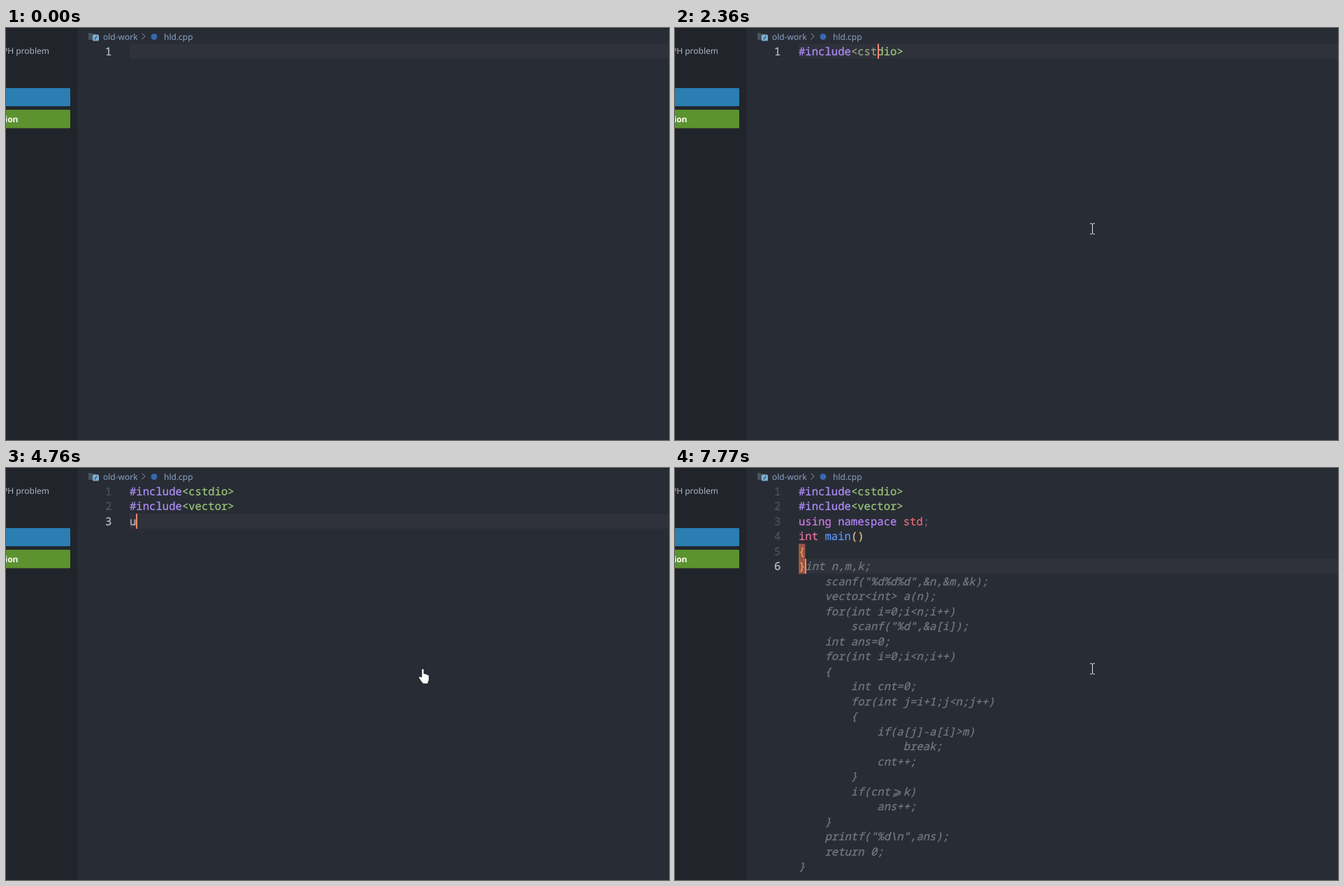
These frames come from a looping animation (949x590 px, 8 s). An HTML page:

```html
<!DOCTYPE html>
<html lang="zh">
<head>
<meta charset="utf-8">
<title>Typing in a code editor</title>
<style>
  html, body { margin: 0; width: 100%; height: 100%; overflow: hidden; background: #282c34; }
  svg { display: block; width: 949px; height: 590px; }
  text { white-space: pre; text-rendering: geometricPrecision; }
  .code {
    font: 15.6px "Noto Sans Mono", "DejaVu Sans Mono", monospace;
    font-variant-ligatures: none;
    fill: currentColor; stroke: currentColor; stroke-width: .3px;
  }
  .ghost { font-style: italic; color: #74777e; }
  .chosen { font-weight: 700; stroke: none; }
  .ui { font: 12px "Noto Sans", "Open Sans", sans-serif; }
  .hint { font: 10.8px "Noto Sans", "Noto Sans CJK SC", "DejaVu Sans", sans-serif; fill: #5d6472; }
  .doc { font: 15px "Noto Sans", "Noto Sans CJK SC", sans-serif; fill: #929aa8; }
</style>
</head>
<body>
<svg viewBox="0 0 949 590">
  <rect width="949" height="590" fill="#282c34"/>
  <rect width="949" height="1" fill="#21252b"/>
  <rect width="102" height="590" fill="#21252b"/>
  <rect x="-4" y="86" width="96" height="26" rx="1.500" fill="#2a7eb2"/>
  <rect x="-4" y="117" width="96" height="26.500" rx="1.500" fill="#5c922f"/>
  <text class="ui" x="62" y="37" text-anchor="end" fill="#abb1bb">PH problem</text>
  <text class="ui" x="17.500" y="135" text-anchor="end" fill="#fff" style="font-weight:600">tion</text>
  <path d="M118 7h4l1.500 1.500h6V17H118z" fill="#46545f"/>
  <rect x="124" y="9.500" width="9" height="9" rx="1.500" fill="#7fafd0"/>
  <path d="M127 16.500l3-5" stroke="#2d4a60" stroke-width="1.300"/>
  <path d="M194.500 7.500l4.500 4.500-4.500 4.500" fill="none" stroke="#8b98aa"/>
  <circle cx="212" cy="12.500" r="4.500" fill="#3568b0"/>
  <g class="ui" fill="#8ba2c4">
    <text x="139" y="16.500">old-work</text>
    <text x="226" y="16.500">hld.cpp</text>
  </g>
  <g id="code"></g>
  <rect id="caret" width="2" height="21.500" fill="#f5876c"/>
  <g id="popup"></g>
  <g id="mouse">
    <path id="beam" d="M-3.500-7.500H-1L0-6.500 1-7.500H3.500M0-6.500V6.500M-3.500 7.500H-1L0 6.500 1 7.500H3.500" fill="none" stroke="#e6e7e9"/>
    <path id="hand" d="M-2.500 12V1.500a1.600 1.600 0 0 1 3.200 0V7l1.300-.3 1.200 1 1.600-.2 1 1.200 1.300.1 1 1.200v6l-1.500 3.500V21.500H-.5L-4 17-6.800 12.800q.3-2 2-1.500z" fill="#fff" stroke="#15171a" stroke-width=".8"/>
  </g>
</svg>
<script>
const LOOP = 8000, LEFT = 177, TOP = 22.5, CH = 9.36, ROW = 21.5, MOVE = 70;
const GREY = '#b0b5bf', VIOLET = '#ab8bf5', GREEN = '#98c379', OLIVE = '#95a384';
const BRACE = '#f09a5c', MOUSE = [597.5, 287.5], MOUSE_IN = [889, 579];
const $ = id => document.getElementById(id);
const esc = s => s.replace(/&/g, '&amp;').replace(/</g, '&lt;');
const colX = c => LEFT + CH * c;
const rowY = r => TOP + ROW * r;
const rect = (x, y, w, h, fill, more = '') =>
  `<rect x="${x}" y="${y}" width="${w}" height="${h}" fill="${fill}" ${more}/>`;
const text = (x, y, s, cls, more = '') =>
  `<text class="${cls}" x="${x}" y="${y}" ${more}>${esc(s)}</text>`;
const codeAt = (x, r, s, color) => text(x, rowY(r) + 16.3, s, 'code', `color="${color}"`);

// A row is a flat list: text, colour, text, colour...
const typed = s => [s, GREY];
const header = (s, color = GREEN) => ['#include', VIOLET, '<' + s, color];
const IO = header('cstdio>'), VEC = header('vector>');
const USING = ['using', '#c678dd', ' namespace', '#b083f5', ' std', '#e06c75', ';', '#6b5d74'];
const MAIN = ['int', '#e5709c', ' main', '#5b92f0', '()', '#e5c07b'];
const BODY = `int n,m,k;
    scanf("%d%d%d",&n,&m,&k);
    vector<int> a(n);
    for(int i=0;i<n;i++)
        scanf("%d",&a[i]);
    int ans=0;
    for(int i=0;i<n;i++)
    {
        int cnt=0;
        for(int j=i+1;j<n;j++)
        {
            if(a[j]-a[i]>m)
                break;
            cnt++;
        }
        if(cnt>=k)
            ans++;
    }
    printf("%d\\n",ans);
    return 0;
}`;

const LISTS = {
  i: 'include if ifdef ifndef import include_next ident line',
  in: 'include include_next ifndef define line ident',
  '<': 'algorithm any array atomic barrier bit bitset cassert ccomplex cctype cerrno cfenv',
  '<c': 'cstdio cassert ccomplex cctype cerrno cfenv cfloat charconv chrono cinttypes ciso646 climits',
  '<cs': 'cstdio csetjmp csignal cstdalign cstdarg cstdbool cstddef cstdint cstdlib cstring cscapi.h cspcall.h',
  '<cst': 'cstdio cstdalign cstdarg cstdbool cstddef cstdint cstdlib cstring',
  '<v': 'vector verinfo.ver version versionhelpers.h vfw.h vfwmsgs.h vidcap.h virtdisk.h vmr9.h vpclmulqdqintrin.h vsadmin.h vsanimation.h',
  '<ve': 'vector verinfo.ver version versionhelpers.h vdserr.h vfwext.h videoacc.h vsserror.h vswriter.h',
  u: 'using union unsigned undef uint8_t uint16_t uint32_t uint64_t uintmax_t uintptr_t u16string u32string',
  us: 'using unsigned u16string u32string',
  usi: 'using unsigned u16string u32string'
};

// Each step changes only the listed parts of the editor state.
const two = row => [IO, row], three = row => [IO, VEC, row];
const steps = [
  [0, { rows: [[]], caret: null, ghost: '', list: '', hand: false, blink: false, match: false }],
  [310, { caret: [0, 0] }],
  [810, { rows: [typed('#')], caret: [0, 1] }],
  [1100, { rows: [typed('#i')], caret: [0, 2] }],
  [1180, { list: 'i' }],
  [1290, { rows: [typed('#in')], caret: [0, 3], list: 'in' }],
  [1470, { rows: [typed('#include')], caret: [0, 8], list: '', ghost: ' <iostream>' }],
  [1550, { rows: [['#include', VIOLET]] }],
  [1720, { rows: [header('', OLIVE)], caret: [0, 9], ghost: '' }],
  [1790, { list: '<' }],
  [1880, { rows: [header('c', OLIVE)], caret: [0, 10], list: '<c' }],
  [2030, { rows: [header('cs', OLIVE)], caret: [0, 11], list: '<cs' }],
  [2180, { rows: [header('cst', OLIVE)], caret: [0, 12], list: '<cst' }],
  [2360, { rows: [[...header('cst', OLIVE), 'dio>', GREEN]], caret: [0, 16], list: '' }],
  [2520, { rows: [IO] }],
  [2630, { rows: two([]), caret: [1, 0] }],
  [2880, { rows: two(typed('#')), caret: [1, 1] }],
  [3050, { rows: two(typed('#i')), caret: [1, 2] }],
  [3120, { list: 'i' }],
  [3190, { rows: two(typed('#in')), caret: [1, 3], list: 'in' }],
  [3340, { rows: two(['#include', VIOLET]), caret: [1, 8], list: '' }],
  [3600, { rows: two(header('', OLIVE)), caret: [1, 9] }],
  [3670, { list: '<' }],
  [3720, { rows: two(header('v', OLIVE)), caret: [1, 10], list: '<v' }],
  [3880, { rows: two(header('ve', OLIVE)), caret: [1, 11], list: '<ve', hand: true }],
  [4120, { rows: two(VEC), caret: [1, 16], list: '' }],
  [4350, { rows: three([]), caret: [2, 0] }],
  [4690, { rows: three(typed('u')), caret: [2, 1] }],
  [4790, { list: 'u', hand: false }],
  [4850, { rows: three(typed('us')), caret: [2, 2], list: 'us' }],
  [5010, { rows: three(typed('usi')), caret: [2, 3], list: 'usi' }],
  [5200, { rows: three(USING.slice(0, 2)), caret: [2, 5], list: '' }],
  [5340, { ghost: ' namespace std;' }],
  [5720, { rows: three(USING), caret: [2, 20], ghost: '' }],
  [6090, { rows: [...three(USING), []], caret: [3, 0] }],
  [6450, { ghost: 'int main()\n{' }],
  [6660, { blink: true }],
  [6950, { rows: [...three(USING), MAIN, ['{', BRACE]], caret: [4, 1], ghost: '', blink: false }],
  [7330, { rows: [...three(USING), MAIN, ['{', BRACE], []], caret: [5, 4] }],
  [7510, { ghost: BODY }],
  [7700, { rows: [...three(USING), MAIN, ['{', BRACE], ['}', BRACE]], caret: [5, 1], match: true }]
];

let last = { from: null, moved: 0 };
const states = steps.map(([at, change]) => {
  const s = { ...last, ...change, at };
  if (change.caret) {
    s.from = last.caret || change.caret;
    s.moved = at;
  }
  return last = s;
});

function drawGhost(s) {
  const [r, c] = s.caret;
  return s.ghost.split('\n').map((line, i) => {
    const x = colX(i ? 0 : c), y = rowY(r + i) + 16.3;
    const wide = line.indexOf('>=');
    const sign = wide < 0 ? '' :
      text(x + (wide + 1) * CH, y, '⩾', 'code ghost', 'text-anchor="middle"');
    return text(x, y, line.replace('>=', '  '), 'code ghost') + sign;
  }).join('');
}

function drawCode(s) {
  const active = s.caret ? s.caret[0] : 0;
  let out = rect(LEFT, rowY(active), 949 - LEFT, ROW, '#2f313b');
  if (s.match) out += [4, 5].map(r => rect(LEFT, rowY(r), CH, ROW, '#985544')).join('');
  s.rows.forEach((row, r) => {
    out += codeAt(142, r, `${r + 1}`, r === active ? '#b9bfca' : '#4b5363');
    for (let i = 0, c = 0; i < row.length; c += row[i].length, i += 2) {
      out += codeAt(colX(c), r, row[i], row[i + 1]);
    }
  });
  return s.ghost ? out + drawGhost(s) : out;
}

// Blue for the letters that match what has been typed, in order.
function label(name, query, x, y, chosen) {
  let k = 0;
  const spans = [...name].map(ch => {
    const hit = ch === query[k];
    if (hit) k++;
    return `<tspan color="${hit ? '#4d82ee' : chosen ? '#d3d6dc' : '#8f96a4'}">${ch}</tspan>`;
  }).join('');
  return `<text class="code ${chosen ? 'chosen' : ''}" x="${x}" y="${y}">${spans}</text>`;
}

function icon(name, file, x, y) {
  if (!file) return rect(x + 1, y - 4, 9, 8, 'none', 'stroke="#8a9aa5"');
  if (name.endsWith('.h')) return `<circle cx="${x + 5}" cy="${y}" r="4.5" fill="#3f70c8"/>`;
  return `<path d="M${x} ${y - 5.5}h11v7l-4 4h-7z" fill="#8798a2"/><path d="M${x + 7} ${y + 5.5}v-4h4z" fill="#c3ccd1"/>`;
}

function drawPopup(s) {
  if (!s.list) return '';
  const [r, c] = s.caret, names = LISTS[s.list].split(' ');
  const file = s.list[0] === '<', query = s.list.replace('<', '');
  const x = Math.round(colX(c)) + .5, y = Math.round(rowY(r + 1)) + .5;
  const first = rowY(r + 1) + 1, listH = names.length * ROW;
  const box = 'stroke="#191c21"';
  const hover = Math.floor((MOUSE[1] - first) / ROW);
  let out = rect(x, y, 421, listH + 23, '#22262d', box);
  names.forEach((name, i) => {
    const top = first + i * ROW, snapped = Math.round(top);
    if (!i || i === hover) {
      out += rect(x + .5, snapped, 420, Math.round(top + ROW) - snapped, '#3a5080');
    }
    out += icon(name, file, x + 5, top + 10.75) + label(name, query, x + 24, top + 16.3, !i);
  });
  if (names.length === 12) out += rect(x + 410.5, y + 81, 10, 108, '#3b4150');
  const base = y + listH + 15;
  out += rect(x + .5, Math.round(first + listH) + 1, 420, 1, '#191c21')
    + text(x + 6.5, base, '替换 (⏎),', 'hint') + text(x + 58, base, '插入 (Shift+⏎)', 'hint')
    + text(x + 413.5, base, '显示更多 (Ctrl+Space)', 'hint', 'text-anchor="end"');
  const dx = x + 426.5;
  out += rect(x + 421, y, 333, file ? 88 : 30, '#22262d', box)
    + text(dx, y + 19.5, file ? '文件' : names[0], 'doc', 'style="font-size:15.5px"');
  if (file) {
    out += text(dx, y + 56.5, 'C:\\TDM-GCC-64\\lib\\gcc\\x86_64-w64-', 'doc')
      + text(dx, y + 78.5, 'mingw32\\13.1.0\\include\\c++\\' + names[0], 'doc');
  }
  return out;
}

const easeOut = p => 1 - (1 - p) ** 2;
const progress = (t, start, length) => easeOut(Math.min(1, Math.max(0, (t - start) / length)));
const mix = (a, b, p) => a + (b - a) * p;
const show = (id, on) => $(id).setAttribute('visibility', on ? 'visible' : 'hidden');
let shown = null;

function render(t) {
  const s = states.findLast(state => state.at <= t);
  if (s !== shown) {
    $('code').innerHTML = drawCode(s);
    $('popup').innerHTML = drawPopup(s);
    shown = s;
  }
  show('caret', s.caret && !s.blink);
  if (s.caret) {
    const p = progress(t, s.moved, MOVE);
    $('caret').setAttribute('x', Math.round(colX(mix(s.from[1], s.caret[1], p)) - .3));
    $('caret').setAttribute('y', rowY(mix(s.from[0], s.caret[0], p)));
  }
  const m = progress(t, 80, 310);
  const [mx, my] = MOUSE.map((v, i) => mix(MOUSE_IN[i], v, m));
  $('mouse').setAttribute('transform', `translate(${mx} ${my})`);
  show('beam', t >= 80 && !s.hand);
  show('hand', s.hand);
}

const start = performance.now();
function tick() {
  render((performance.now() - start) % LOOP);
  requestAnimationFrame(tick);
}
tick();
</script>
</body>
</html>
```
